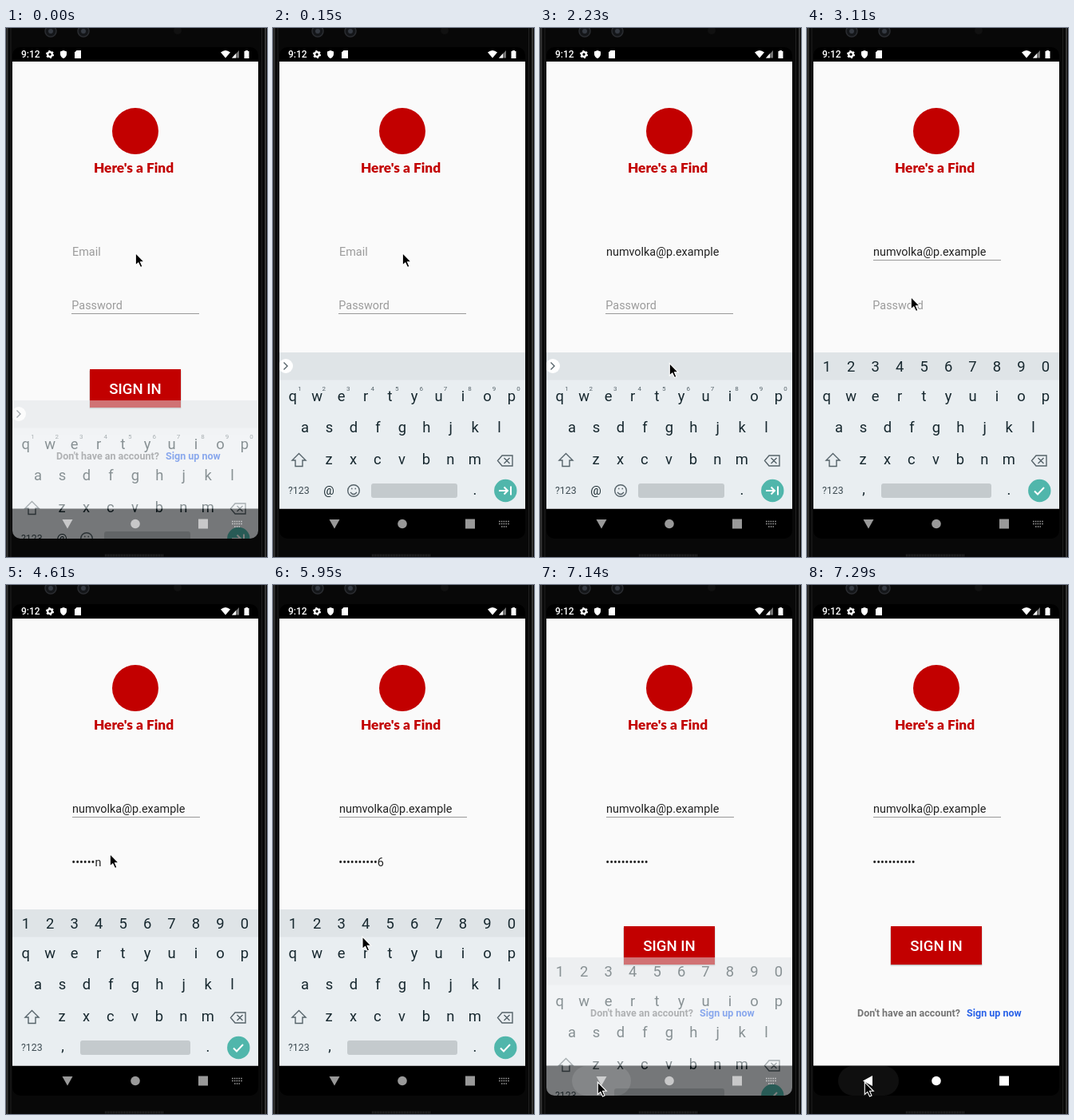
An HTML page for the animation above (8000 ms loop, 327x662 px).

```html
<!DOCTYPE html>
<html lang="en">
<head>
<meta charset="utf-8">
<title>Sign in</title>
<style>
  html, body { margin: 0; width: 100%; height: 100%; overflow: hidden; background: #000; }
  svg { display: block; width: 327px; height: 662px; font-family: Roboto, sans-serif; }
  .field { font-size: 14.4px; fill: #222; }
  .field.hint { fill: #9b9b9b; }
  .field.composing { text-decoration: underline; }
  .line { stroke: #999; }
  .mid { text-anchor: middle; }
  .key { font-size: 18.4px; fill: #17282f; text-anchor: middle; }
  .sup { font-size: 8px; fill: #56636a; text-anchor: middle; }
  .icon { fill: none; stroke: #56636a; stroke-width: 1.4; }
</style>
</head>
<body>
<svg viewBox="0 0 327 662">
  <defs>
    <clipPath id="screen"><rect x="8" y="24" width="308" height="615" rx="10"/></clipPath>
    <clipPath id="navClip"><rect x="8" y="602" width="308" height="37" rx="6"/></clipPath>
  </defs>

  <!-- Phone body -->
  <rect width="327" height="662" fill="#080808"/>
  <path d="M1.500 0V662M325 0V662" stroke="#363636" stroke-width="2"/>
  <path d="M6 0V662M320.500 0V662" stroke="#202020"/>
  <g fill="#141619" stroke="#2a2c30" stroke-width="1.5">
    <circle cx="56" cy="4" r="7"/><circle cx="97" cy="4" r="7"/>
  </g>
  <g fill="#343941"><circle cx="56" cy="4" r="3"/><circle cx="97" cy="4" r="3"/></g>
  <circle cx="215" cy="3" r="5" fill="#111"/>
  <path d="M124 660H198" stroke="#2b2b2b" stroke-width="3" stroke-dasharray="1 1"/>

  <g clip-path="url(#screen)">
    <rect x="8" y="24" width="308" height="615"/>
    <rect x="8" y="42" width="308" height="559.500" fill="#fafafa"/>

    <!-- Status bar -->
    <g fill="#fff">
      <text x="19" y="37" font-size="12" font-weight="500">9:12</text>
      <circle cx="55" cy="33" r="2.8" fill="none" stroke="#fff" stroke-width="2.2"/>
      <circle cx="55" cy="33" r="4.3" fill="none" stroke="#fff" stroke-width="1.6" stroke-dasharray="2.2 2.3"/>
      <path d="M72 28L76 29.600V33Q75.500 36.700 72 38Q68.500 36.700 68 33V29.600Z"/>
      <path d="M88.500 28H94V38H86V30.500Z"/>
      <path d="M269 30.500Q275 25.500 281 30.500L275 37.500Z"/>
      <path d="M292 28V37.500H283Z" opacity=".45"/><path d="M288 32V37.500H283Z"/>
      <path d="M300 28H303V29H304.500V38H298.500V29H300Z"/>
    </g>

    <!-- Sign-in page -->
    <circle cx="162" cy="129" r="29" fill="#c20000"/>
    <text class="mid" x="160" y="181" font-family="Lato, sans-serif" font-size="17.3" font-weight="900" fill="#c20000">Here's a Find</text>
    <text id="email" x="83" y="285"></text>
    <path id="emailLine" class="line" d="M83 290.500H243"/>
    <text id="password" x="82.300" y="351.500"></text>
    <path id="passwordLine" class="line" d="M82 357.500H242"/>
    <rect x="104.500" y="428.500" width="115" height="48" rx="1" fill="#000" opacity=".22"/>
    <rect x="105" y="427" width="114" height="48" fill="#c20000"/>
    <text class="mid" x="162" y="458" font-size="18.600" font-weight="500" fill="#fff">SIGN IN</text>
    <g font-size="12.500" font-weight="700">
      <text x="63" y="540" fill="#757575">Don't have an account?</text>
      <text x="200" y="540" fill="#2962e8">Sign up now</text>
    </g>

    <g id="keyboard">
      <rect x="8" y="406" width="308" height="195.500" fill="#e9eef1"/>
      <rect x="8" y="406" width="308" height="34.500" fill="#dfe4e7"/>
      <g id="letters"></g>
      <path class="icon" d="M32.500 532.500L41 541H37V548.500H28V541H24Z"/>
      <path class="icon" d="M287 535H300V548H287L281.500 541.500ZM289.500 538L296.500 545M296.500 538L289.500 545"/>
      <text class="mid" x="32.300" y="583" font-size="12.300" fill="#3c4a51">?123</text>
      <text class="key" x="253" y="584">.</text>
      <circle cx="291.300" cy="579" r="14.200" fill="#50b6ab"/>

      <g id="emailKeys">
        <circle cx="16" cy="423" r="9" fill="#fff"/>
        <path class="icon" d="M13.500 418.500L18 423L13.500 427.500"/>
        <g id="suggestions" class="mid">
          <path d="M116.500 414V432M206.500 414V432" stroke="#c3c9cd"/>
          <text x="77" y="429" font-size="14.800" fill="#68757b">num</text>
          <text x="161" y="418" font-size="11" font-weight="500" fill="#4d5b62">numvolka</text>
          <text x="161" y="430.500" font-size="9.400" fill="#68757b">@p.example</text>
        </g>
        <text class="key" x="70" y="584" style="font-size:15px">@</text>
        <circle class="icon" cx="101" cy="579" r="7.300"/>
        <path class="icon" d="M97 581Q101 586 105 581M98 576.500H99.500M102.500 576.500H104"/>
        <rect x="123" y="570" width="108" height="18" rx="3" fill="#c4cacd"/>
        <path d="M283 579H294M289.500 574.500L294 579L289.500 583.500M298 573.500V584.500" fill="none" stroke="#fff" stroke-width="2"/>
      </g>
      <g id="passwordKeys">
        <text class="key" x="71" y="583">,</text>
        <rect x="93" y="570" width="138" height="18" rx="3" fill="#c4cacd"/>
        <path d="M285 579.500L289 583.500L297 575" fill="none" stroke="#fff" stroke-width="2"/>
      </g>
    </g>

    <!-- Navigation bar -->
    <g clip-path="url(#navClip)"><rect id="ripple" y="602" height="37" rx="18.500" fill="#fff"/></g>
    <g id="nav" fill="#fff">
      <path id="back"/>
      <circle cx="162" cy="620.500" r="5.800"/>
      <rect x="241" y="614.500" width="12" height="12"/>
      <path id="imeIcon" d="M283 617.500H296M283 620.500H296M286 624H293" stroke="#fff" stroke-width="1.500" stroke-dasharray="1.600 1.200"/>
    </g>
  </g>

  <path id="cursor" d="M0 0V15.500L3.500 12.300L6.200 18L8.700 17L6.200 11.300H11Z" stroke="#fff" stroke-width="1.100"/>
</svg>

<script>
const LOOP = 8000;
const EMAIL = "numvolka@p.example";
const PASSWORD = "kalovenbr16";
const el = Object.fromEntries([...document.querySelectorAll("[id]")].map(node => [node.id, node]));

// Step tables: [start time, value...]
const cursorSteps = [
  [0, 162.3, 281.5], [1490, 162.3, 300], [1640, 162.3, 355], [1790, 162.3, 420], [1940, 162.3, 445],
  [2080, 162.3, 426], [2230, 162.3, 419.5], [2380, 161, 405], [2530, 156, 380],
  [2670, 146, 358], [2820, 134, 341], [2960, 130.3, 336.5],
  [5950, 112, 440], [6100, 77, 575], [6250, -50, 0], [6550, 72, 628], [6700, 72.3, 622]
];
const emailSteps = [[0, 0], [290, 1], [440, 2], [740, 3], [2230, EMAIL.length]];
const passwordSteps = [
  [0, 0], [3710, 1], [3860, 2], [4010, 3], [4310, 5], [4610, 7],
  [4760, 8], [4910, 9], [5500, 10], [5650, 11]
];
// Vertical offset and opacity
const keyboardSteps = [[0, 60, .5], [150, 0, 1], [7140, 60, .5], [7290, 60, 0]];
// Left edge, width and opacity
const rippleSteps = [[0, 0, 0, 0], [7000, 44, 66, .13], [7140, 40, 74, .11], [7290, 39, 76, .06]];

const at = (steps, t) => steps.findLast(step => step[0] <= t).slice(1);
const show = (node, visible) => node.setAttribute("display", visible ? "inline" : "none");

function row(chars, x, y, style = "key") {
  return [...chars].map((c, i) =>
    `<text class="${style}" x="${x + 30.45 * i}" y="${y}">${c}</text>`).join("");
}
el.letters.innerHTML = row("qwertyuiop", 24.8, 467) + row("asdfghjkl", 40, 506) + row("zxcvbnm", 70, 545.5);
el.emailKeys.insertAdjacentHTML("beforeend", row("1234567890", 33.4, 454, "sup"));
el.passwordKeys.insertAdjacentHTML("beforeend", row("1234567890", 24.8, 430));

function setField(node, text, hint, extra = "") {
  node.textContent = text || hint;
  node.setAttribute("class", `field ${text ? extra : "hint"}`);
}

function draw(t) {
  const [x, y] = at(cursorSteps, t);
  el.cursor.setAttribute("transform", `translate(${x} ${y})`);

  const [typed] = at(emailSteps, t);
  const composing = typed > 0 && typed < EMAIL.length;
  setField(el.email, EMAIL.slice(0, typed), "Email", composing ? "composing" : "");

  const [count] = at(passwordSteps, t);
  const masked = t >= 7140 ? count : Math.max(count - 1, 0);
  setField(el.password, "•".repeat(masked) + PASSWORD.slice(masked, count), "Password");

  const onPassword = t >= 2960;
  show(el.emailLine, onPassword);
  show(el.passwordLine, !onPassword);
  show(el.emailKeys, !onPassword);
  show(el.passwordKeys, onPassword);
  show(el.suggestions, typed === 3);

  const [offset, opacity] = at(keyboardSteps, t);
  el.keyboard.setAttribute("transform", `translate(0 ${offset})`);
  el.keyboard.setAttribute("opacity", opacity);

  const closed = opacity === 0;
  el.nav.setAttribute("opacity", closed ? 1 : .6);
  el.back.setAttribute("d", closed ? "M70 620.500L82 614V627Z" : "M70.500 615H83.500L77 626.500Z");
  show(el.imeIcon, !closed);

  const [left, width, glow] = at(rippleSteps, t);
  el.ripple.setAttribute("x", left);
  el.ripple.setAttribute("width", width);
  el.ripple.setAttribute("opacity", glow);
}

const start = performance.now();
function tick() {
  draw((performance.now() - start) % LOOP);
  requestAnimationFrame(tick);
}
tick();
</script>
</body>
</html>
```
